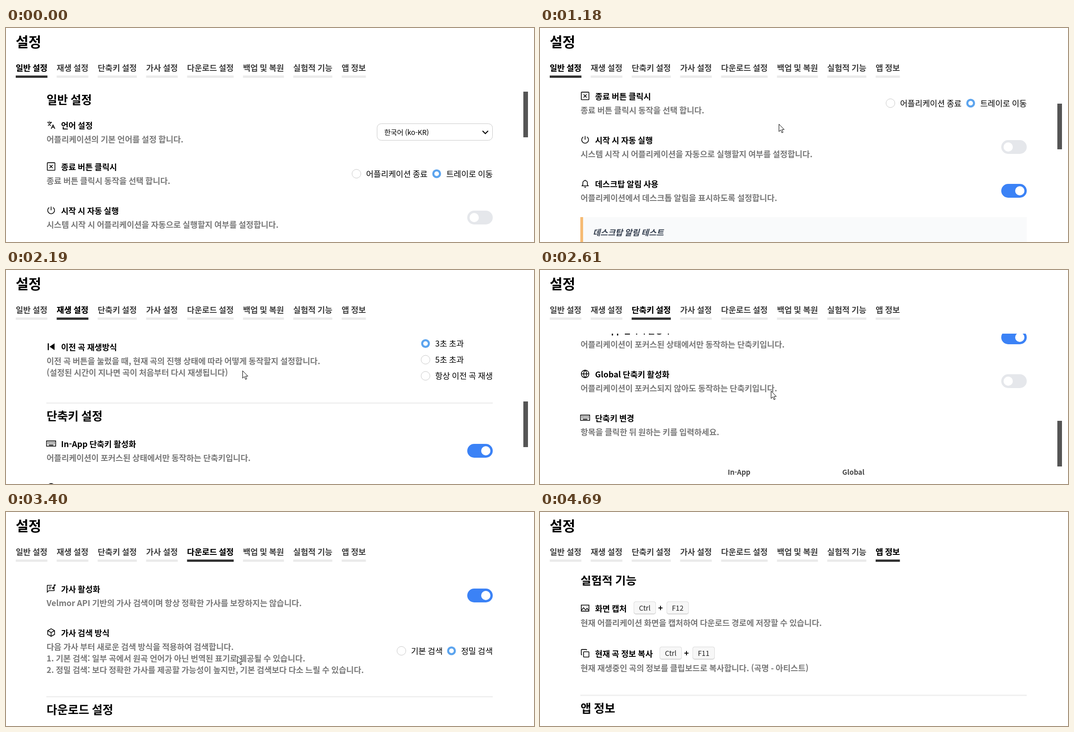
These frames come from a looping animation (1139x464 px, 5.18 s). An HTML page with a canvas:

```html
<!DOCTYPE html>
<html lang="ko">
<head>
<meta charset="utf-8">
<title>설정</title>
<style>
  html, body { margin: 0; width: 100%; height: 100%; overflow: hidden; background: #fff; }
  canvas { display: block; }
</style>
</head>
<body>
<canvas id="stage" width="1139" height="464"></canvas>
<script>
const W = 1139, H = 464, LOOP = 5180, TOP = 138;
const LEFT = 87, RIGHT = 1050;
const SANS = '"Noto Sans CJK KR", "Noto Sans KR", "Noto Sans CJK", sans-serif';
const KEYS = 'Roboto, "Noto Sans CJK KR", "Noto Sans CJK", sans-serif';
const ctx = document.getElementById('stage').getContext('2d');

// Each move: [start, end, target]
const SCROLL = [
  [890, 1360, 225], [1460, 1600, 494], [1850, 2330, 954],
  [2410, 2890, 1376], [2960, 3480, 2050], [3510, 4070, 2842]
];
const POINTER_X = [
  [50, 250, 554], [530, 650, 515], [1460, 1520, 510],
  [2410, 2560, 498], [2960, 3120, 499], [4250, 4690, 1010]
];
const POINTER_Y = [
  [50, 250, 208], [1460, 1520, 218], [2410, 2560, 262],
  [2960, 3120, 312], [4250, 4690, 466]
];
const TABS = [
  ['일반 설정', -200], ['재생 설정', 1470], ['단축키 설정', 2470], ['가사 설정', 3100],
  ['다운로드 설정', 3250], ['백업 및 복원', 3650], ['실험적 기능', 3800], ['앱 정보', 3960]
];

// Icons on a 24 unit grid: [stroked path, filled path]
const ICONS = {
  lang: ['M5 8l6 6M4 14l6-6 2-3M2 5h12M7 2h1M22 22l-5-10-5 10M14 18h6'],
  close: ['M3 2h18a1 1 0 0 1 1 1v18a1 1 0 0 1-1 1H3a1 1 0 0 1-1-1V3a1 1 0 0 1 1-1M8 8l8 8M16 8l-8 8'],
  power: ['M12 2v10M7 4.5a9 9 0 1 0 10 0'],
  bell: ['M4 18h16l-2-3v-5a6 6 0 0 0-12 0v5zM12 4V2M10 21.5h4'],
  history: ['M3 12a9 9 0 1 1 3 6.7M0 10l3 3 3-3M12 7v5l4 2.5'],
  phones: ['M3 16v-4a9 9 0 0 1 18 0v4', 'M2 13h5v9a5 5 0 0 1-5-5zM22 13h-5v9a5 5 0 0 0 5-5z'],
  ban: ['M22 12a10 10 0 1 1-20 0a10 10 0 0 1 20 0M5 5l14 14'],
  prev: ['', 'M3 3h3v18H3zM21 3v18L8 12z'],
  keyboard: ['M0 5h24v14H0zM3 9h2m2 0h2m2 0h2m2 0h2m2 0h2M3 12.5h2m2 0h2m2 0h2m2 0h2m2 0h2M6 16h12'],
  globe: ['M22 12a10 10 0 1 1-20 0a10 10 0 0 1 20 0M2 12h20M12 2c5 5 5 15 0 20c-5-5-5-15 0-20'],
  lyrics: ['M14 3H2v18l4-4h14v-4M6 8h7M6 12h5', 'M19 1h5v3h-3v6a3 3 0 1 1-2-2.8z'],
  cube: ['M12 2l9 5v10l-9 5-9-5V7zM3 7l9 5 9-5M12 12v10'],
  image: ['M2 4h20v16H2zM2 18l6-7 5 6 4-4 5 5M15 8.5h1'],
  copy: ['M9 8h12a1 1 0 0 1 1 1v12a1 1 0 0 1-1 1H9a1 1 0 0 1-1-1V9a1 1 0 0 1 1-1M4 16H3a1 1 0 0 1-1-1V3a1 1 0 0 1 1-1h12a1 1 0 0 1 1 1v1'],
  down: ['M12 3v12M7 10l5 5 5-5M3 17v4h18v-4'],
  up: ['M12 15V3M7 8l5-5 5 5M3 17v4h18v-4'],
  folder: ['M2 4h7l3 3h10v13H2z']
};
for (const name in ICONS) ICONS[name] = ICONS[name].map(d => new Path2D(d));

const ARROW = new Path2D('M.5 .5V16.6L4.2 13.1L6.8 19.2L9.3 18.1L6.8 12.2H11.8Z');

const clamp = v => Math.max(0, Math.min(1, v));
const ease = p => 0.5 - 0.5 * Math.cos(Math.PI * p);

function track(t, from, moves) {
  let v = from;
  for (const [a, b, to] of moves) v += (to - v) * ease(clamp((t - a) / (b - a)));
  return v;
}

// y is the visual middle of the glyphs
function text(str, x, y, { size = 17.5, weight = 500, color = '#000', align = 'left', font = SANS, style = '', gap = 0 } = {}) {
  ctx.font = `${style} ${weight} ${size}px ${font}`;
  ctx.letterSpacing = gap + 'px';
  ctx.textAlign = align;
  ctx.fillStyle = color;
  ctx.fillText(str, x, Math.round(y + size * 0.375));
}

function box(x, y, w, h, r, fill, line) {
  ctx.beginPath();
  ctx.roundRect(x, y, w, h, r);
  if (fill) { ctx.fillStyle = fill; ctx.fill(); }
  if (line) { ctx.strokeStyle = line; ctx.lineWidth = 1; ctx.stroke(); }
}

function disc(x, y, r, fill) {
  ctx.beginPath();
  ctx.arc(x, y, r, 0, 7);
  ctx.fillStyle = fill;
  ctx.fill();
}

function icon(name, y) {
  const [line, solid] = ICONS[name];
  ctx.save();
  ctx.translate(87.5, y - 10.5);
  ctx.scale(0.82, 0.82);
  ctx.lineWidth = 1.9;
  ctx.strokeStyle = ctx.fillStyle = '#000';
  ctx.stroke(line);
  if (solid) ctx.fill(solid);
  ctx.restore();
}

function heading(str, y, ruled = true) {
  if (ruled) {
    ctx.fillStyle = '#f0f0f0';
    ctx.fillRect(LEFT, y - 30, RIGHT - LEFT, 3);
  }
  text(str, 87.5, y, { size: 25, weight: 700 });
}

function item(name, title, y, lines, drop = 30) {
  icon(name, y);
  text(title, 118.7, y, { weight: 700 });
  lines.forEach((s, i) => text(s, 87.5, y + drop + 25 * i, { weight: 600, color: '#797979' }));
}

function radio(x, y, label, on) {
  if (on) {
    disc(x, y, 9.5, '#5ca4ee');
    disc(x, y, 5, '#fff');
  } else {
    ctx.beginPath();
    ctx.arc(x, y, 9.5, 0, 7);
    ctx.strokeStyle = '#c8c8c8';
    ctx.lineWidth = 1;
    ctx.stroke();
  }
  text(label, x + 20.7, y);
}

function toggle(y, on) {
  box(995, y - 15, 55, 30, 15, on ? '#3b82f6' : '#e5e7eb');
  disc(on ? 1035 : 1010, y, 10, '#fff');
}

function select(x, y, label) {
  box(x + 0.5, y - 18.5, RIGHT - x - 1, 36, 9, '#fff', '#c9c9c9');
  text(label, x + 16, y, { size: 15 });
  ctx.beginPath();
  ctx.moveTo(1028, y - 3);
  ctx.lineTo(1034, y + 3);
  ctx.lineTo(1040, y - 3);
  ctx.lineWidth = 2;
  ctx.strokeStyle = '#000';
  ctx.stroke();
}

function cap(x, y, w, label) {
  box(x, y - 14, w, 28, 5, '#cfcfcf');
  box(x + 0.5, y - 13.5, w - 1, 26, 4, '#f7f7f7', '#dcdcdc');
  text(label, x + w / 2, y, { size: 15, align: 'center', color: '#222' });
}

function combo(x, y, key) {
  cap(x, y, 48, 'Ctrl');
  text('+', x + 58, y, { weight: 700, align: 'center' });
  cap(x + 71, y, 48, key);
}

function general() {
  heading('일반 설정', 156, false);
  item('lang', '언어 설정', 211, ['어플리케이션의 기본 언어를 설정 합니다.']);
  select(800, 226, '한국어 (ko-KR)');
  item('close', '종료 버튼 클릭시', 301, ['종료 버튼 클릭시 동작을 선택 합니다.']);
  radio(756, 316, '어플리케이션 종료');
  radio(929, 316, '트레이로 이동', true);
  item('power', '시작 시 자동 실행', 396, ['시스템 시작 시 어플리케이션을 자동으로 실행할지 여부를 설정합니다.']);
  toggle(411, false);
  item('bell', '데스크탑 알림 사용', 491, ['어플리케이션에서 데스크톱 알림을 표시하도록 설정합니다.']);
  toggle(506, true);
  box(LEFT, 563, RIGHT - LEFT, 66, 0, '#f9fafb');
  box(LEFT, 563, 6, 66, 0, '#f6bb74');
  text('데스크탑 알림 테스트', 114, 596, { weight: 600, style: 'italic', color: '#374151' });
  item('history', '최대 검색 기록 항목', 666, ['검색 기록에 대한 최대 항목 수를 지정하세요.']);
  ['7', '10', '15'].forEach((n, i) => radio(900 + 55 * i - (i ? 5 : 0) + (i > 1 ? 5 : 0), 681, n, !i));
}

function playback() {
  heading('재생 설정', 784);
  item('phones', '오디오 출력 장치', 839, ['기본 오디오 출력 장치를 선택합니다.']);
  select(650, 853, 'Default - 헤드폰(KB-2400ZN3)');
  item('ban', '재생 오류 발생시', 929, ['재생 URL을 찾을 수 없을 때의 동작을 선택합니다.']);
  radio(837, 944, '일시정지');
  radio(941, 944, '다음 곡 재생', true);
  item('prev', '이전 곡 재생방식', 1031, [
    '이전 곡 버튼을 눌렀을 때, 현재 곡의 진행 상태에 따라 어떻게 동작할지 설정합니다.',
    '(설정된 시간이 지나면 곡이 처음부터 다시 재생됩니다)'
  ]);
  ['3초 초과', '5초 초과', '항상 이전 곡 재생'].forEach((s, i) => radio(905, 1023.5 + 35 * i, s, !i));
}

const ROWS = [
  ['재생 / 일시정지', 'Space'], ['5초 앞으로 이동', 'Right'], ['5초 뒤로 이동', 'Left'],
  ['볼륨 올리기기', 'Up'], ['볼륨 내리기', 'Down'], ['다음 곡', 'Ctrl + Right'],
  ['이전 곡', 'Ctrl + Left'], ['셔플', 'S'], ['반복', 'R']
];
const rowY = i => Math.floor(1596 + 52.5 * i);

function shortcuts() {
  heading('단축키 설정', 1181);
  item('keyboard', 'In-App 단축키 활성화', 1241, ['어플리케이션이 포커스된 상태에서만 동작하는 단축키입니다.']);
  toggle(1256, true);
  item('globe', 'Global 단축키 활성화', 1336, ['어플리케이션이 포커스되지 않아도 동작하는 단축키입니다.']);
  toggle(1351, false);
  item('keyboard', '단축키 변경', 1431, ['항목을 클릭한 뒤 원하는 키를 입력하세요.']);

  const head = { size: 15, weight: 700, color: '#444', align: 'center' };
  text('In-App', 429.5, 1548.5, head);
  text('Global', 676, 1548.5, head);
  const cell = { size: 15, weight: 700, align: 'center', font: KEYS, gap: 0.75 };
  ROWS.forEach(([label, key], i) => {
    const y = rowY(i);
    text(label, 207, y, cell);
    box(319, y - 20, 220, 40, 8, '#d9d9d9');
    text(key, 429.5, y + 0.5, cell);
    box(566, y - 20, 220, 40, 8, '#efefef');
    text('None', 676, y + 0.5, { ...cell, color: '#999' });
  });
}

function lyrics() {
  heading('가사 설정', 2118);
  item('lyrics', '가사 활성화', 2178, ['Velmor API 기반의 가사 검색이며 항상 정확한 가사를 보장하지는 않습니다.']);
  toggle(2192, true);
  item('cube', '가사 검색 방식', 2273, [
    '다음 가사 부터 새로운 검색 방식을 적용하여 검색합니다.',
    '1. 기본 검색: 일부 곡에서 원곡 언어가 아닌 번역된 표기로 제공될 수 있습니다.',
    '2. 정밀 검색: 보다 정확한 가사를 제공할 가능성이 높지만, 기본 검색보다 다소 느릴 수 있습니다.'
  ]);
  radio(853, 2312, '기본 검색');
  radio(961, 2312, '정밀 검색', true);
}

function files() {
  heading('다운로드 설정', 2440);
  item('folder', '다운로드 경로', 2500, ['다운로드한 파일을 저장할 경로를 설정합니다.']);
  cap(960, 2515, 90, '폴더 선택');
  item('down', '다운로드 형식', 2595, ['다운로드할 파일의 형식을 선택합니다.']);
  select(800, 2610, 'MP3');
  heading('백업 및 복원', 2713);
  item('up', '데이터 백업', 2773, ['현재 설정과 데이터를 파일로 백업합니다.']);
  cap(980, 2788, 70, '백업');
  item('down', '데이터 복원', 2868, ['백업한 파일에서 데이터를 복원합니다.']);
  cap(980, 2883, 70, '복원');
}

function extras() {
  heading('실험적 기능', 2990);
  item('image', '화면 캡처', 3051, ['현재 어플리케이션 화면을 캡처하여 다운로드 경로에 저장할 수 있습니다.'], 31);
  combo(202, 3050, 'F12');
  item('copy', '현재 곡 정보 복사', 3149, ['현재 재생중인 곡의 정보를 클립보드로 복사합니다. (곡명 - 아티스트)'], 31);
  combo(258, 3148, 'F11');
  heading('앱 정보', 3268);
}

function header(t) {
  text('설정', 21, 29.5, { size: 30, weight: 700 });
  let x = 21;
  TABS.forEach(([label, at], i) => {
    const next = TABS[i + 1];
    const ramp = a => clamp((t - a) / 100);
    const on = ramp(at) - (next ? ramp(next[1]) : 0);
    text(label, x, 86.5, { weight: 600, color: '#404040' });
    const w = ctx.measureText(label).width;
    const bar = color => box(x, 103, w, 5, 0, color);
    bar('#ebebeb');
    if (on > 0) {
      ctx.globalAlpha = on;
      bar('#333');
      text(label, x, 86.5, { weight: 700 });
      ctx.globalAlpha = 1;
    }
    x += w + 20;
  });
}

function pointer(t, scroll) {
  if (t < 50 || t >= 4690) return;
  const x = Math.round(track(t, 991, POINTER_X));
  const y = Math.round(track(t, 435, POINTER_Y));
  const overKey = x > 319 && x < 539 && ROWS.some((_, i) => Math.abs(rowY(i) - scroll - y) < 20);
  ctx.save();
  ctx.translate(x, y);
  ctx.lineWidth = 1;
  ctx.strokeStyle = '#000';
  if (overKey) {
    ctx.stroke(new Path2D('M-3 -7.5H0M1 -7.5H4M.5 -7V7M-3 7.5H0M1 7.5H4'));
  } else {
    ctx.fillStyle = '#fff';
    ctx.fill(ARROW);
    ctx.stroke(ARROW);
  }
  ctx.restore();
}

function draw(t) {
  const scroll = Math.round(track(t, 0, SCROLL));
  ctx.fillStyle = '#fff';
  ctx.fillRect(0, 0, W, H);
  header(t);

  ctx.save();
  ctx.beginPath();
  ctx.rect(0, TOP, W, H - TOP);
  ctx.clip();
  box(1116, TOP + Math.round(scroll / 5.88), 10, 99, 0, '#555');
  ctx.translate(0, -scroll);
  [general, playback, shortcuts, lyrics, files, extras].forEach(part => part());
  ctx.restore();

  pointer(t, scroll);
}

const begin = performance.now();
function tick() {
  const t = (performance.now() - begin) % LOOP;
  draw(Math.floor(t / 10) * 10);
  requestAnimationFrame(tick);
}
tick();
</script>
</body>
</html>
```
